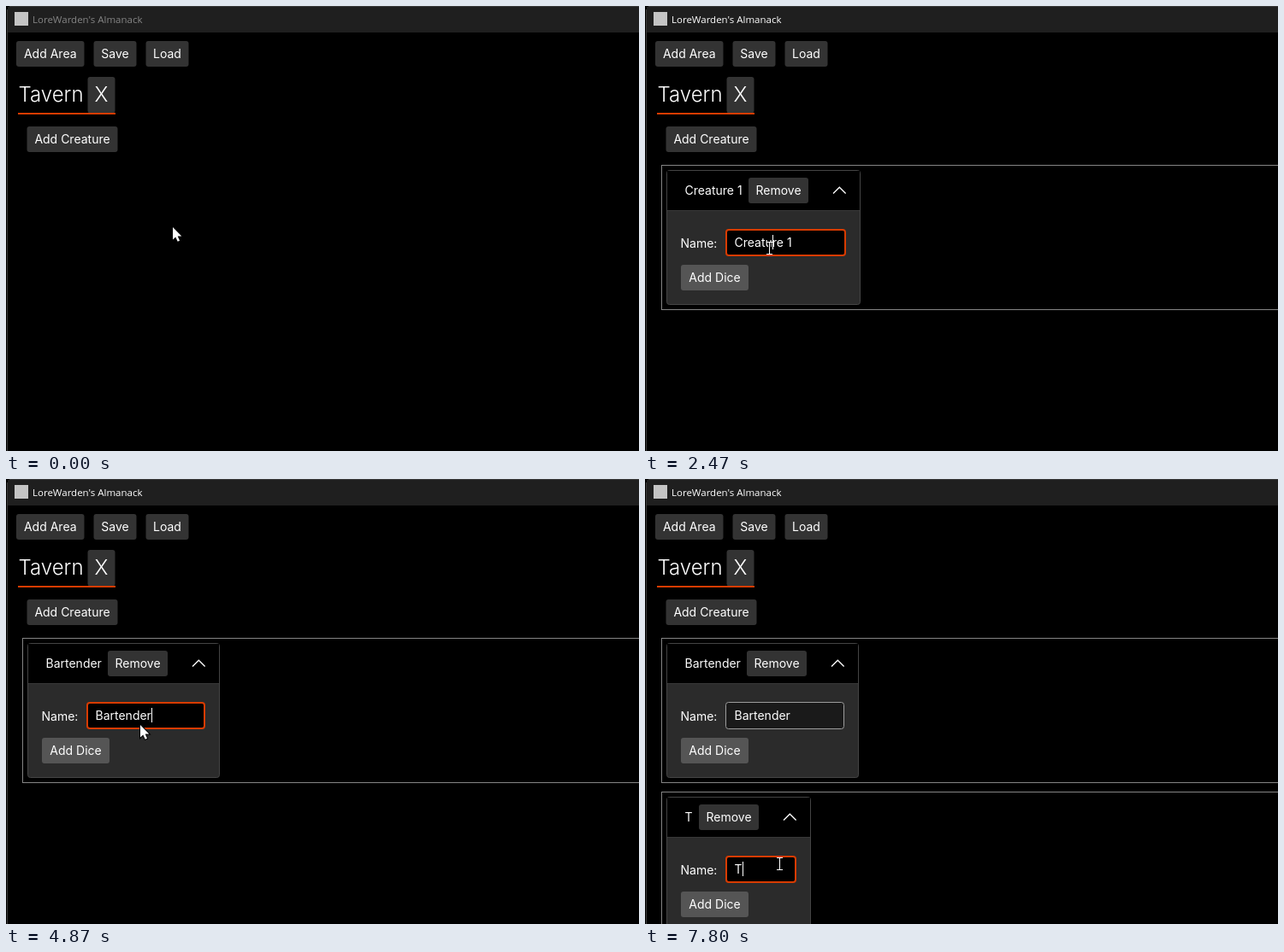
These frames come from a looping animation (740x521 px, 8 s). An HTML page with a canvas:

```html
<!DOCTYPE html>
<html lang="en">
<head>
<meta charset="utf-8">
<title>Creature list</title>
<style>
  html, body { margin: 0; width: 100%; height: 100%; overflow: hidden; background: #000; }
  canvas { display: block; }
</style>
</head>
<body>
<canvas id="stage" width="740" height="521"></canvas>
<script>
const ctx = document.getElementById('stage').getContext('2d');
const LOOP = 8000, TICKS_PER_MS = 0.015;
const ACCENT = '#d83b01';
const UI = '14px Inter, sans-serif';
const HEADING = '300 24px Inter, sans-serif';

// Pointer path: [tick, x, y]
const path = [
  [0, 195, 259], [3, 148, 236], [5, 148, 236], [14, 65, 159], [20, 65, 159],
  [30, 145, 283], [42, 145, 283], [44, 157, 288], [80, 157, 288], [88, 87, 167],
  [92, 87, 167], [93, 100, 205], [94, 125, 290], [95, 150, 376], [96, 166, 441],
  [99, 157, 450], [120, 157, 450]
];

// Ticks at which each creature is added, edited and left
const creatures = [
  { y: 186, added: 20, initial: 'Creature 1', typed: 'Bartender',
    keys: [53, 55, 56, 59, 61, 68, 70, 71, 73], focus: 37, word: 39, all: 41, blur: 89 },
  { y: 366, added: 92, initial: 'Creature 2', typed: 'T',
    keys: [117], focus: 102, word: 104, all: 109, blur: Infinity }
];
const presses = [[16, 20], [89, 92]];

function pointerAt(tick) {
  const i = Math.max(1, path.findIndex(p => p[0] >= tick));
  const [t0, x0, y0] = path[i - 1], [t1, x1, y1] = path[i];
  const k = (tick - t0) / (t1 - t0);
  const ease = t1 - t0 > 4 ? k * k * (3 - 2 * k) : k;
  return { x: Math.round(x0 + (x1 - x0) * ease), y: Math.round(y0 + (y1 - y0) * ease) };
}

const inside = (p, x, y, w, h) => p.x > x && p.x < x + w && p.y > y && p.y < y + h;

function rect(x, y, w, h, color) {
  ctx.fillStyle = color;
  ctx.fillRect(x, y, w, h);
}

function rounded(x, y, w, h, fill, stroke, line = 1) {
  const inset = stroke ? line / 2 : 0;
  ctx.beginPath();
  ctx.roundRect(x + inset, y + inset, w - 2 * inset, h - 2 * inset, 3);
  ctx.fillStyle = fill;
  ctx.fill();
  if (stroke) {
    ctx.lineWidth = line;
    ctx.strokeStyle = stroke;
    ctx.stroke();
  }
}

function text(str, x, baseline, font = UI, color = '#fff', align = 'left') {
  ctx.font = font;
  ctx.fillStyle = color;
  ctx.textAlign = align;
  ctx.fillText(str, x, baseline);
}

function textWidth(str) {
  ctx.font = UI;
  return ctx.measureText(str).width;
}

function button(label, x, y, w, h = 30, fill = '#333', scale = 1) {
  ctx.save();
  ctx.translate(x + w / 2, y + h / 2);
  ctx.scale(scale, scale);
  rounded(-w / 2, -h / 2, w, h, fill);
  text(label, 0, 5, UI, '#fff', 'center');
  ctx.restore();
}

function drawWindow(tick, pointer) {
  rect(0, 0, 740, 521, '#000');
  rect(2, 1, 738, 30, '#1f1f1f');
  rect(4, 0, 736, 1, '#3a3a3a');
  rect(1, 4, 1, 517, '#3a3a3a');
  rect(10, 7, 16, 16, '#c4c4c4');
  text("LoreWarden's Almanack", 31, 20, '11.5px "Open Sans", sans-serif', tick < 16 ? '#858585' : '#fff');

  button('Add Area', 12, 41, 79.5);
  button('Save', 102.5, 41, 50);
  button('Load', 163.5, 41, 50);

  text('Tavern', 14.5, 112, HEADING);
  rounded(95.5, 83, 32, 42.5, '#333');
  text('X', 111.5, 112, HEADING, '#fff', 'center');
  rect(14, 125, 114, 2, ACCENT);

  const pressed = presses.some(([down, up]) => tick >= down && tick < up);
  const settling = presses.some(edges => edges.includes(tick));
  const hovered = inside(pointer, 24, 141, 107, 30);
  button('Add Creature', 24.5, 141, 106, 30,
    pressed ? '#666' : hovered ? '#191919' : '#333',
    settling ? 0.99 : pressed ? 0.98 : 1);
}

function drawInput(c, name, tick, pointer, y, w) {
  const focused = tick >= c.focus && tick < c.blur;
  const hovered = inside(pointer, 94, y, w, 32);
  if (focused) rounded(94, y, w, 32, '#000', ACCENT, 2);
  else rounded(94, y, w, 32, hovered ? '#111' : '#1a1a1a', hovered ? '#ccc' : '#9c9c9c');

  const x = 104.5;
  let caret = name;
  if (focused && tick < c.keys[0]) {
    caret = tick >= c.all ? name : tick >= c.word ? 'Creature' : 'Creatu';
    if (tick >= c.word) rect(x, y + 7, textWidth(caret), 17, ACCENT);
  }
  text(name, x, y + 21);
  if (focused) rect(Math.round(x + textWidth(caret)), y + 7, 1, 17, '#fff');
}

function drawCreature(c, tick, pointer) {
  const count = c.keys.filter(k => tick >= k).length;
  const name = count ? c.typed.slice(0, count) : c.initial;
  const right = Math.round(46.5 + textWidth(name) + 138);
  const top = c.y + 6, width = right - 25;

  ctx.lineWidth = 1;
  ctx.strokeStyle = '#858585';
  ctx.strokeRect(19.5, c.y + 0.5, 740, 169);

  rounded(25, top, width, 158, '#2b2b2b', '#444');
  rect(26, top + 1, width - 2, 46, '#000');
  rect(26, top + 47, width - 2, 1, '#383838');

  const overRemove = inside(pointer, right - 61, top + 9, 70 - 140, 30) ||
    inside(pointer, right - 131, top + 9, 70, 30);
  const overHeader = inside(pointer, 25, top, width, 47);
  text(name, 46.5, top + 29);
  button('Remove', right - 131, top + 9, 70, 30, overRemove ? '#191919' : '#333');
  if (overHeader) rounded(right - 41, top + 8, 32, 32, '#191919');

  ctx.beginPath();
  ctx.moveTo(right - 32, top + 27.5);
  ctx.lineTo(right - 24.7, top + 20.2);
  ctx.lineTo(right - 17.4, top + 27.5);
  ctx.lineWidth = 1.3;
  ctx.strokeStyle = '#fff';
  ctx.stroke();

  text('Name:', 41.5, top + 91);
  drawInput(c, name, tick, pointer, top + 69, right - 17 - 94);
  button('Add Dice', 42, top + 111, 79, 30, '#555');
}

function drawPointer(p, beam) {
  ctx.save();
  ctx.translate(p.x, p.y);
  if (beam) {
    rect(-1, -7, 3, 15, '#000');
    rect(0, -7, 1, 15, '#fff');
    for (const y of [-7, 7]) {
      rect(-3, y, 3, 1, '#fff');
      rect(1, y, 3, 1, '#fff');
    }
  } else {
    const arrow = new Path2D('M0 0V14.6L3.3 11.5L5.7 16.8L8 15.8L5.7 10.6H10.3Z');
    ctx.lineWidth = 2;
    ctx.strokeStyle = '#000';
    ctx.stroke(arrow);
    ctx.fillStyle = '#fff';
    ctx.fill(arrow);
  }
  ctx.restore();
}

function draw(now) {
  const tick = Math.floor((now % LOOP + 4) * TICKS_PER_MS) % 120;
  const pointer = pointerAt(tick);
  drawWindow(tick, pointer);
  const visible = creatures.filter(c => tick >= c.added);
  for (const c of visible) drawCreature(c, tick, pointer);

  // The text cursor stays an arrow while the first name is typed
  const typing = tick >= 43 && tick < 89;
  const beam = !typing && visible.some(c => inside(pointer, 94, c.y + 75, 140, 32));
  drawPointer(pointer, beam);
}

const start = performance.now();
function loop() {
  draw(performance.now() - start);
  requestAnimationFrame(loop);
}
loop();
</script>
</body>
</html>
```
